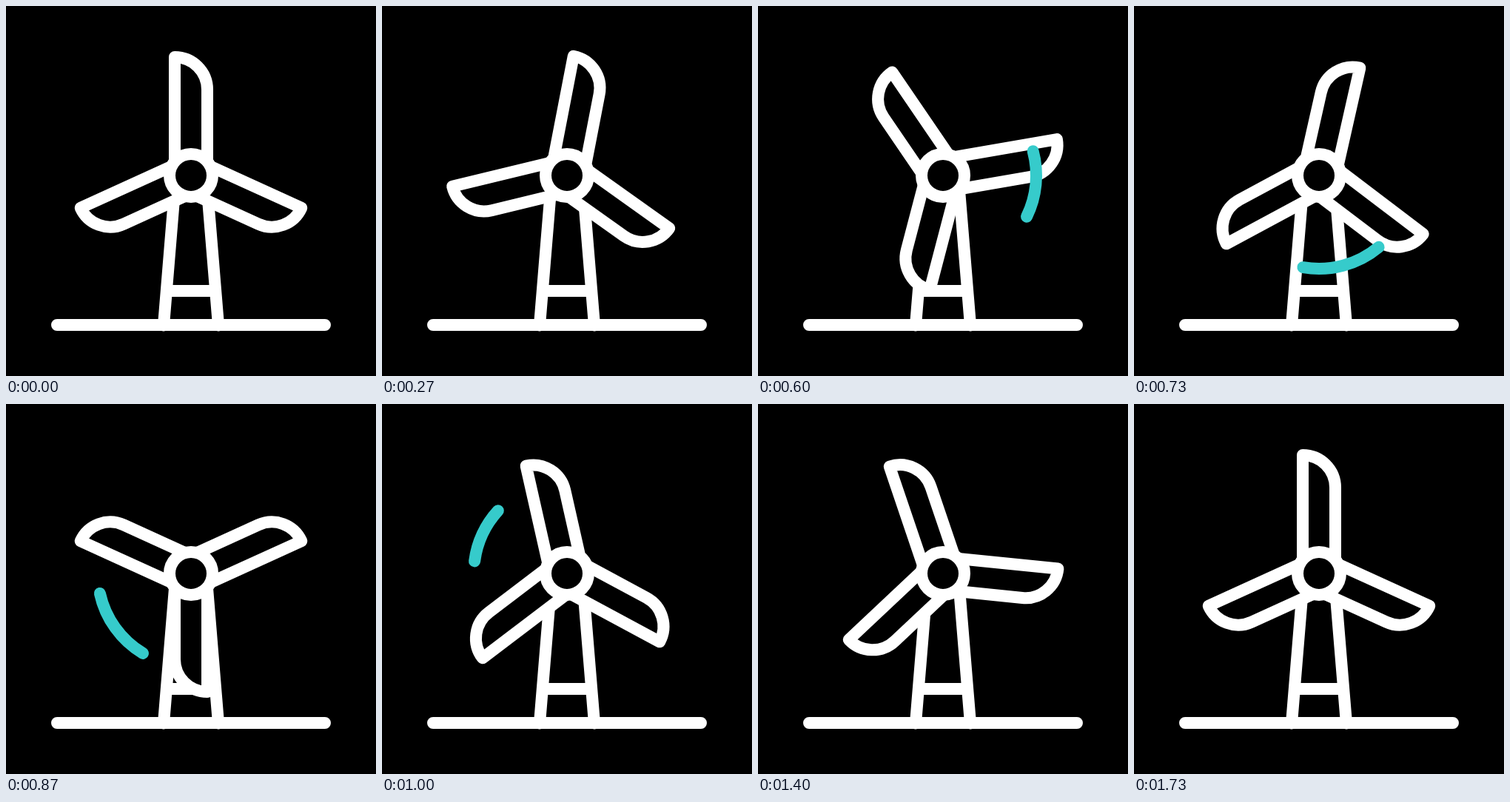
Recreate the animation shown at these times as an HTML page. Size 500 px wide and 500 px high, loop 1.94 s.

```html
<!DOCTYPE html>
<html lang="en">
<head>
<meta charset="utf-8">
<title>Wind turbine</title>
<style>
  html, body { margin: 0; height: 100%; overflow: hidden; background: #000; }
  svg { display: block; width: 100vw; height: 100vh; }
</style>
</head>
<body>
<svg viewBox="0 0 500 500" stroke="#fff" stroke-width="16" stroke-linejoin="round" stroke-linecap="round">
  <path d="M69 431H431M228 249L213 431.5M272 249L287 431.5M220 385H280"/>
  <g transform="translate(250 229)">
    <g id="rotor">
      <path d="M-22 -19V-160A44 44 0 0 1 22 -116V-19"/>
      <path id="side" transform="rotate(114.5)" d="M-22 -19V-154A44 44 0 0 1 22 -110V-19"/>
      <use href="#side" transform="scale(-1 1)"/>
    </g>
    <circle r="29"/>
    <path id="trail" fill="none" stroke="#36cbcb"/>
  </g>
</svg>
<script>
  const LOOP = 1940, STEP = 1000 / 15, RADIUS = 126;
  const rotor = document.getElementById('rotor');
  const trail = document.getElementById('trail');

  // Share of the way from a to b, kept within 0 and 1.
  const part = (x, a, b) => Math.min(1, Math.max(0, (x - a) / (b - a)));
  const smooth = u => u * u * (3 - 2 * u);

  // Angles in degrees, clockwise from the top.
  function spin(step) {
    const u = part(step, 0, 26);
    return 360 * (u - 0.15 * Math.sin(2 * Math.PI * u));
  }
  const tail = step => 360 * smooth(part(step, 4.55, 19.7));
  const head = step => 360 * smooth(part(step, 4.8, 18.9) ** 0.8);

  function point(deg) {
    const a = deg * Math.PI / 180;
    return `${RADIUS * Math.sin(a)} ${-RADIUS * Math.cos(a)}`;
  }

  function draw(now) {
    // The motion advances 15 times a second.
    const step = Math.floor((now % LOOP + 4) / STEP);
    const from = tail(step), to = head(step);
    rotor.setAttribute('transform', `rotate(${spin(step)})`);
    trail.setAttribute('d', to - from < 0.5 ? ''
      : `M${point(from)}A${RADIUS} ${RADIUS} 0 0 1 ${point(to)}`);
  }

  const start = performance.now();
  function tick() {
    draw(performance.now() - start);
    requestAnimationFrame(tick);
  }
  tick();
</script>
</body>
</html>
```
